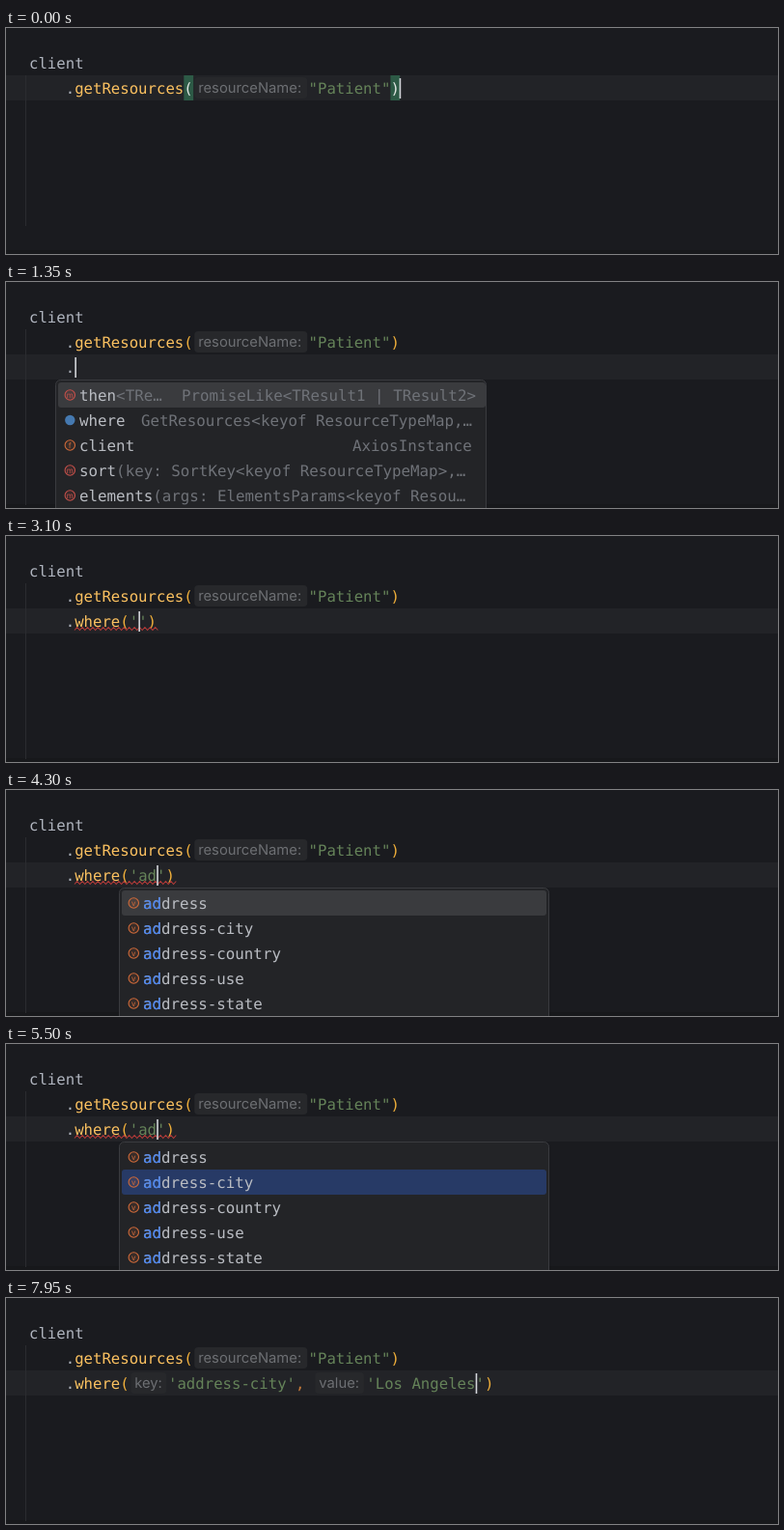
Animation of 800x234 px, one loop 8000 ms. Source, as an HTML page:

```html
<!DOCTYPE html>
<html lang="en">
<head>
<meta charset="utf-8">
<title>Code completion</title>
<style>
  html, body { margin: 0; width: 100%; height: 100%; overflow: hidden; background: #1a1b1f; }
  svg { display: block; width: 800px; height: 234px; }
  text { white-space: pre; text-rendering: geometricPrecision; }
  .code { font: 15.66px "DejaVu Sans Mono", monospace; }
  .item { font: 15.83px "DejaVu Sans Mono", monospace; }
  .hint { font: 14.8px Inter, sans-serif; }
  .icon { font: 8px Inter, sans-serif; text-anchor: middle; }
</style>
</head>
<body>
<svg id="stage" viewBox="0 0 800 234"></svg>
<script>
const LOOP = 8000;
const CELL = 9.43, ITEM_CELL = 9.53, LEFT = 24, ROW = 26;
const C = {
  bg: '#1a1b1f', row: '#222327', strip: '#17181b', guide: '#2b2c30',
  plain: '#b0b5bf', gold: '#fbc160', paren: '#eeae3a', string: '#658359', comma: '#c77a38',
  hintBg: '#27282b', hint: '#6d6f73', match: '#2d5a46', matched: '#dfe5e2',
  caret: '#d3d5da', error: '#b63b39', menu: '#232427', edge: '#3a3b3f',
  idle: '#3a3b3e', active: '#273a66', label: '#b9bcc2', dim: '#6f7278', hit: '#4682f0'
};
const RED = '#c4504a', ORANGE = '#cf6a3a';

// kind, label, detail, colour, right-aligned type
const menus = {
  members: { x: 51, right: 498, barEnd: 497, items: [
    ['m', 'then', '<TRe…', RED, 'PromiseLike<TResult1 | TResult2>', 182],
    ['', 'where', '', '#4579b0', 'GetResources<keyof ResourceTypeMap,…', 140],
    ['f', 'client', '', ORANGE, 'AxiosInstance', 359],
    ['m', 'sort', '(key: SortKey<keyof ResourceTypeMap>,…', RED],
    ['m', 'elements', '(args: ElementsParams<keyof Resou…', RED]
  ] },
  params: { x: 117, right: 563, barEnd: 560, prefix: true,
    items: ['', '-city', '-country', '-use', '-state'].map(s => ['v', 'address' + s, '', ORANGE]) }
};

// Each step changes part of the state from its time on.
const steps = [
  [0, { line: 1, name: '', arg: '', tail: '', open: false, match: true, error: false,
        hints: false, menu: '', pick: 0, active: false, caret: true }],
  [50, { caret: false }],
  [350, { line: 2, match: false, caret: true }],
  [550, { name: '.' }],
  [750, { menu: 'members' }],
  [1600, { pick: 1, active: true }],
  [2200, { menu: '', pick: 0, active: false, name: '.where', open: true, match: true }],
  [2600, { error: true }],
  [2900, { arg: "'", tail: "'", match: false }],
  [3500, { caret: false }],
  [3750, { arg: "'a", caret: true }],
  [3950, { arg: "'ad" }],
  [4100, { menu: 'params' }],
  [5000, { pick: 1, active: true }],
  [5600, { menu: '', arg: "'address-city'", tail: '', match: true }],
  [6050, { caret: false }],
  [6250, { caret: true }],
  [6400, { arg: "'address-city'," }],
  [6750, { arg: "'address-city', " }],
  [6900, { arg: "'address-city', '", tail: "'", match: false }],
  ...[...'Los Angeles'].map((_, i, all) =>
    [7000 + i * 65, { arg: "'address-city', '" + all.slice(0, i + 1).join('') }]),
  [7800, { hints: true, error: false }]
];
let acc = {};
const states = steps.map(([time, change]) => [time, acc = { ...acc, ...change }]);

const esc = s => s.replace(/&/g, '&amp;').replace(/</g, '&lt;').replace(/>/g, '&gt;');
const rect = (x, y, w, h, fill, more = '') =>
  `<rect x="${x}" y="${y}" width="${w}" height="${h}" fill="${fill}" ${more}/>`;
const text = (x, y, s, fill, cls = 'code') =>
  `<text x="${x}" y="${y}" fill="${fill}" class="${cls}">${esc(s)}</text>`;

// A pen that writes tokens from left to right on one editor line.
function pen(line, col) {
  const top = 23 + line * ROW, base = top + 19;
  return {
    x: LEFT + col * CELL, out: '',
    put(s, fill) {
      this.out += text(this.x, base, s, fill);
      this.x += s.length * CELL;
    },
    brace(s, lit) {
      if (lit) this.out += rect(this.x, top, CELL + .4, ROW, C.match);
      this.put(s, lit ? C.matched : C.paren);
    },
    hint(s, w, advance) {
      this.out += rect(this.x + 1.5, top + 2, w, 22, C.hintBg, 'rx="4"') +
        text(this.x + 5.4, base - .7, s, C.hint, 'hint');
      this.x += advance;
    }
  };
}

const caretAt = (x, line) => rect(x, 26 + line * ROW, 1.6, 21, C.caret);

function wave(from, to) {
  let d = `M${from} 97.5`;
  for (let x = from, up = true; x < to; x += 2.7, up = !up) d += `l2.7 ${up ? -3 : 3}`;
  return `<path d="${d}" fill="none" stroke="${C.error}" stroke-width="1.1"/>`;
}

function callLine(s) {
  const p = pen(2, 4);
  if (s.name) p.put('.', C.plain);
  p.put(s.name.slice(1), C.gold);
  let caretX = p.x;
  if (s.open) {
    p.brace('(', s.match);
    caretX = p.x + s.arg.length * CELL;
    let quoted = 0;
    for (const token of (s.arg + s.tail).match(/'[^']*'?|,| /g) || []) {
      if (token[0] === "'" && s.hints) {
        const before = p.x;
        quoted++ ? p.hint('value:', 50.5, 54.4) : p.hint('key:', 37, 40.3);
        caretX += p.x - before;
      }
      p.put(token, token === ',' ? C.comma : C.string);
    }
    const end = p.x;
    p.brace(')', s.match);
    if (s.error) p.out += wave(71, s.arg.includes(',') ? end : p.x);
  }
  return p.out + (s.caret ? caretAt(caretX + .2, 2) : '');
}

function popup(s) {
  const m = menus[s.menu];
  if (!m) return '';
  let out = rect(m.x + .5, 101.5, m.right - m.x - 1, 150, C.menu, `rx="5" stroke="${C.edge}"`);
  m.items.forEach(([kind, label, detail, tint, type, typeX], i) => {
    const mid = 117 + i * ROW, base = mid + 6, cx = m.x + 15.3, x = m.x + 25;
    if (i === s.pick)
      out += rect(m.x + 3, mid - 13, m.barEnd - m.x - 3, ROW, s.active ? C.active : C.idle, 'rx="3"');
    out += kind
      ? `<circle cx="${cx}" cy="${mid}" r="5.2" fill="${tint}" fill-opacity=".12" stroke="${tint}" stroke-width="1.1"/>` +
        text(cx, mid + 2.6, kind, tint, 'icon')
      : `<circle cx="${cx}" cy="${mid}" r="5.2" fill="${tint}"/>`;
    out += text(x, base, label, C.label, 'item');
    if (m.prefix) out += text(x, base, 'ad', C.hit, 'item');
    if (detail) out += text(x + label.length * ITEM_CELL, base, detail, C.dim, 'item');
    if (type) out += text(typeX, base, type, C.dim, 'item');
  });
  return out;
}

function draw(s) {
  const first = pen(0, 0), second = pen(1, 4), lit = s.line === 1 && s.match;
  first.put('client', C.plain);
  second.put('.', C.plain);
  second.put('getResources', C.gold);
  second.brace('(', lit);
  second.hint('resourceName:', 117, 119.8);
  second.put('"Patient"', C.string);
  second.brace(')', lit);
  return rect(0, 0, 800, 234, C.bg) +
    rect(0, 230, 800, 4, C.strip) +
    rect(0, 23 + s.line * ROW, 800, ROW, C.row) +
    rect(20, 49, 1, s.line === 1 ? 156 : 182, C.guide) +
    first.out + second.out +
    (s.line === 1 ? (s.caret ? caretAt(second.x - .2, 1) : '') : callLine(s)) +
    popup(s);
}

const stage = document.getElementById('stage');
const start = performance.now();
let shown;
function tick() {
  const t = (performance.now() - start) % LOOP;
  const state = states.findLast(([time]) => time <= t)[1];
  if (state !== shown) stage.innerHTML = draw(shown = state);
  requestAnimationFrame(tick);
}
tick();
</script>
</body>
</html>
```
